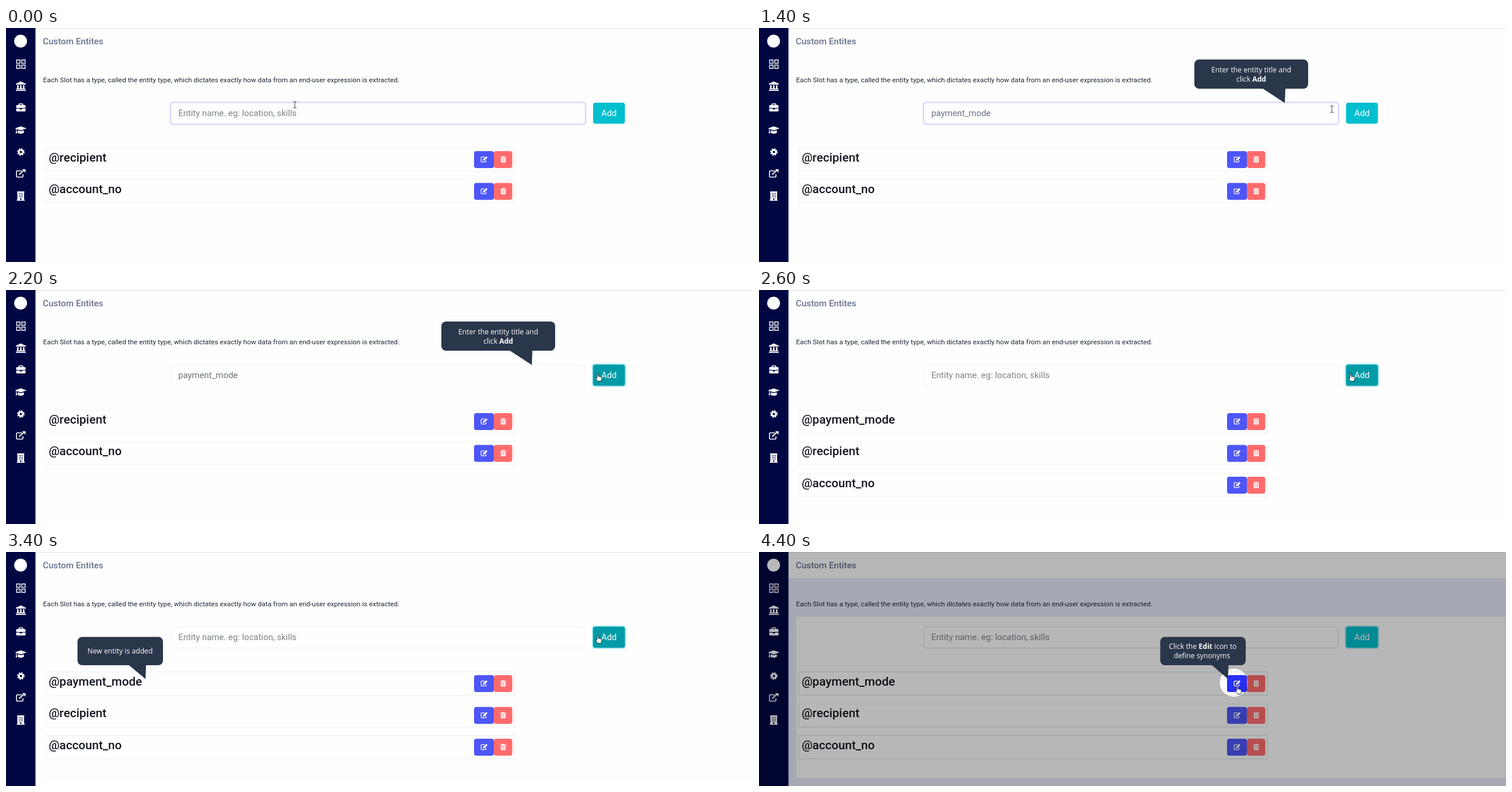
Recreate the animation shown at these times as an HTML page. Size 1280x401 px, loop 5.2 s.

```html
<!DOCTYPE html>
<html lang="en">
<head>
<meta charset="utf-8">
<title>Custom entities</title>
<style>
html, body { margin: 0; width: 100%; height: 100%; overflow: hidden; background: #fefefe; }
svg { display: block; width: 1280px; height: 401px; }
text { font-family: Roboto, sans-serif; white-space: pre; }
.title { font-size: 15.2px; font-weight: 500; fill: #68728f; }
.intro { font-size: 11.8px; fill: #1d2638; }
.field { font-size: 14.9px; fill: #687080; }
.hint { fill: #7d838c; }
.add text { font-size: 14.9px; fill: #fff; }
.name { font-size: 20.6px; font-weight: 500; fill: #141822; }
.tip { fill: #2a364a; }
.tip text { font: 12.2px "Open Sans", "Noto Sans", sans-serif; fill: #fff; text-anchor: middle; }
.tip tspan { font-weight: 700; }
.btns { color: #4d56f6; }
.line { fill: none; stroke: #f0f0f2; }
.rule { stroke: #f7f7f9; }

/* every state change is a hard step on one shared clock */
.t { animation: 5.2s step-end infinite; }
.backdrop { fill: #fefefe; animation-name: backdrop; }
.line.t { animation-name: line; }
.box { animation-name: box; }
.hint { animation-name: hint; }
.one { animation-name: one; }
.two { animation-name: two; }
.full { animation-name: full; }
.caret { animation-name: caret; }
.focus { animation-name: focus; }
.face { fill: #00bfce; animation-name: face; }
.halo { animation-name: halo; }
.old { animation-name: old; }
.new { animation-name: late; }
.hot { animation-name: hot; }
.tip1 { animation-name: tip1; }
.tip2 { animation-name: tip2; }
.dim { animation-name: dim; }
.beam { animation-name: beam; }
.hand { animation-name: hand; }
.arrow { animation-name: arrow; }

@keyframes backdrop { 0% { fill: #fefefe; } 73.076%, 100% { fill: #e7ebf8; } }
@keyframes line { 0% { stroke: #f0f0f2; } 73.076%, 100% { stroke: #d9dbe0; } }
@keyframes box { 0% { stroke: #f7f7fa; } 73.076%, 100% { stroke: #dfe1e7; } }
@keyframes hint { 0% { visibility: visible; } 3.846% { visibility: hidden; } 50%, 100% { visibility: visible; } }
@keyframes one { 0% { visibility: hidden; } 3.846% { visibility: visible; } 7.692%, 100% { visibility: hidden; } }
@keyframes two { 0% { visibility: hidden; } 7.692% { visibility: visible; } 11.538%, 100% { visibility: hidden; } }
@keyframes full { 0% { visibility: hidden; } 11.538% { visibility: visible; } 50%, 100% { visibility: hidden; } }
@keyframes caret {
  0% { visibility: hidden; transform: translateX(0); }
  3.846% { visibility: visible; transform: translateX(305px); }
  7.692% { visibility: visible; transform: translateX(314px); }
  11.538% { visibility: visible; transform: translateX(398px); }
  19.23%, 100% { visibility: hidden; transform: translateX(398px); }
}
@keyframes focus { 0% { visibility: visible; } 38.461%, 100% { visibility: hidden; } }
@keyframes face { 0% { fill: #00bfce; } 30.769% { fill: #009ba7; } 76.923%, 100% { fill: #00bfce; } }
@keyframes halo { 0% { visibility: hidden; } 38.461%, 100% { visibility: visible; } }
@keyframes old { 0% { transform: translateY(0); } 50%, 100% { transform: translateY(54.5px); } }
@keyframes late { 0% { visibility: hidden; } 50%, 100% { visibility: visible; } }
@keyframes hot { 0% { color: #4d56f6; } 80.769%, 100% { color: #2730f4; } }
@keyframes tip1 { 0% { visibility: hidden; } 7.692% { visibility: visible; } 50%, 100% { visibility: hidden; } }
@keyframes tip2 { 0% { visibility: hidden; } 61.538% { visibility: visible; } 76.923%, 100% { visibility: hidden; } }
@keyframes dim { 0% { visibility: hidden; } 73.076%, 100% { visibility: visible; } }
@keyframes beam {
  0% { visibility: visible; transform: translate(495px, 131.5px); }
  11.538% { visibility: visible; transform: translate(619px, 135.5px); }
  15.384% { visibility: visible; transform: translate(924px, 135.5px); }
  19.23% { visibility: visible; transform: translate(976.5px, 137px); }
  26.923% { visibility: visible; transform: translate(981.5px, 139px); }
  30.769%, 100% { visibility: hidden; transform: translate(981.5px, 139px); }
}
@keyframes hand {
  0% { visibility: hidden; transform: translate(1009.5px, 142px); }
  30.769% { visibility: visible; transform: translate(1009.5px, 142px); }
  73.076% { visibility: hidden; transform: translate(815.5px, 229px); }
  80.769%, 100% { visibility: visible; transform: translate(815.5px, 229px); }
}
@keyframes arrow {
  0% { visibility: hidden; transform: translate(978.5px, 181px); }
  73.076% { visibility: visible; transform: translate(978.5px, 181px); }
  76.923% { visibility: visible; transform: translate(928px, 221px); }
  80.769%, 100% { visibility: hidden; transform: translate(928px, 221px); }
}
</style>
</head>
<body>
<svg viewBox="0 0 1280 401" xmlns="http://www.w3.org/2000/svg">
  <defs>
    <g id="btns">
      <rect x="802" y="211" width="34" height="29" rx="4" fill="currentColor"/>
      <rect x="836" y="211" width="31.5" height="29" rx="4" fill="#ff6b6c"/>
      <g transform="translate(813 219)">
        <path d="M7 2.2H2.3Q1.2 2.2 1.2 3.3V9.5Q1.2 10.6 2.3 10.6H8.4Q9.5 10.6 9.5 9.5V7.4" fill="none" stroke="#fff" stroke-width="1.3"/>
        <path d="M4.4 6.2L9.9 .7 12.1 2.9 6.6 8.3 4.2 8.6Z" fill="#fff"/>
      </g>
      <g transform="translate(847 219.5)">
        <path d="M0 1.2H3L3.6 .2H6.4L7 1.2H10V2.5H0ZM.8 3.2H9.2V10Q9.2 11 8.2 11H1.8Q.8 11 .8 10Z" fill="#fff"/>
        <path d="M3.2 4.6V9.4M5 4.6V9.4M6.8 4.6V9.4" stroke="#ff6b6c" stroke-width=".7"/>
      </g>
    </g>
  </defs>

  <!-- page -->
  <rect class="t backdrop" width="1280" height="401"/>
  <rect x="50" width="1230" height="44" fill="#fefefe"/>
  <path class="line rule" d="M50 44.5H1280"/>
  <path d="M50 .5H1280" stroke="#e3e6e9"/>
  <g class="t old">
    <path class="line rule" d="M64 331.5H1279"/>
  </g>
  <g class="t dim">
    <rect x="64" y="111" width="1215" height="275" fill="#fefefe"/>
  </g>
  <text class="title" x="63" y="27.6">Custom Entites</text>
  <text class="intro" x="63.6" y="92.8">Each Slot has a type, called the entity type, which dictates exactly how data from an end-user expression is extracted.</text>

  <!-- sidebar -->
  <rect width="50.5" height="401" fill="#000743"/>
  <circle cx="25" cy="22.5" r="11" fill="#fff"/>
  <g fill="none" stroke="#fff" stroke-width="1.4">
    <path d="M18.2 54.7h5.8v5.8h-5.8zM27 54.7h5.8v5.8h-5.8zM18.2 63.5h5.8v5.8h-5.8zM27 63.5h5.8v5.8h-5.8z"/>
    <path d="M27 244.7H19.2Q18 244.7 18 245.9V254.3Q18 255.5 19.2 255.5H27.8Q29 255.5 29 254.3V250.5" stroke-width="1.6"/>
    <path d="M22.5 251.2L31 243.5" stroke-width="2"/>
  </g>
  <g fill="#fff">
    <path d="M25.3 91.5L34 95.5V97H17V95.5ZM19 98h2.6v5.5h2.4V98h2.6v5.5H29V98h2.6v5.5H33v1.5H18v-1.5h1zM17 105.8H34V107.8H17Z"/>
    <path d="M21.5 132V130.8Q21.5 129.3 23 129.3H28Q29.500 129.300 29.500 130.800V132H32Q33.500 132 33.500 133.500V137H17.500V133.500Q17.500 132 19 132ZM23 132H28V130.800H23ZM17.500 138H23.500V139.500H27.500V138H33.500V141.500Q33.500 143 32 143H19Q17.500 143 17.500 141.500Z" fill-rule="evenodd"/>
    <path d="M25.300 168.500L35.300 172 25.300 175.500 18.400 173.100V176L19.200 180.500H16.600L17.300 176V172.700L15.300 172ZM20.300 175.200L25.300 177 30.300 175.200 30.800 179.500Q25.300 182.800 19.900 179.500Z"/>
    <path d="M27.500 242H33.500V248Z"/>
    <path d="M19 280H31.500V281.500H31V294.300H32V296H18.500V294.300H19.500V281.500H19Z"/>
  </g>
  <g fill="none" stroke="#fff" transform="translate(25.500 212.500)">
    <circle r="3.600" stroke-width="3"/>
    <circle r="5.500" stroke-width="2" stroke-dasharray="2.160"/>
  </g>
  <path d="M22 283.500H29M22 286.500H29M22 289.500H29" stroke="#000743" stroke-width="1.500" stroke-dasharray="1.500 1.200"/>
  <path d="M24 292h2.500v2.500H24z" fill="#000743"/>

  <!-- entry field -->
  <rect class="line t box" x="282.500" y="128" width="710" height="36.500" rx="4"/>
  <g class="t focus" fill="none">
    <rect x="282" y="127.500" width="711" height="37.500" rx="4.500" stroke="#e5e4fd" stroke-width="3.500"/>
    <rect x="282.500" y="128" width="710" height="36.500" rx="4" fill="#fefefe" stroke="#cbc9f8"/>
  </g>
  <text class="t field hint" x="295.200" y="151.400">Entity name. eg: location, skills</text>
  <text class="t field one" x="295.200" y="151.400">p</text>
  <text class="t field two" x="295.200" y="151.400">pa</text>
  <text class="t field full" x="295.200" y="151.400">payment_mode</text>
  <path class="t caret" d="M0 138V155" stroke="#4b5260"/>
  <g class="add">
    <rect class="t halo" x="1004" y="126" width="58.500" height="40" rx="5.500" fill="#9ee6ec"/>
    <rect class="t face" x="1006" y="128" width="54.500" height="36" rx="4"/>
    <text x="1020" y="151.400">Add</text>
  </g>

  <!-- entities -->
  <g class="t new">
    <rect class="line t" x="68.500" y="205.500" width="803" height="40"/>
    <text class="name" x="73.200" y="228.800">@payment_mode</text>
    <use class="btns t hot" href="#btns"/>
  </g>
  <g class="t old">
    <rect class="line t" x="68.500" y="205.500" width="803" height="40"/>
    <text class="name" x="73.200" y="228.800">@recipient</text>
    <use class="btns" href="#btns"/>
    <g transform="translate(0 54.500)">
      <rect class="line t" x="68.500" y="205.500" width="803" height="40"/>
      <text class="name" x="73.200" y="228.800">@account_no</text>
      <use class="btns" href="#btns"/>
    </g>
  </g>

  <!-- callouts -->
  <g class="tip t tip1">
    <rect x="746" y="54" width="195" height="50" rx="8"/>
    <path d="M862 103H902L901 128.500Z"/>
    <text x="843.500" y="75.500">Enter the entity title and</text>
    <text x="843.500" y="91.500">click <tspan>Add</tspan></text>
  </g>
  <g class="tip t tip2">
    <rect x="122.500" y="145.500" width="146.500" height="48.500" rx="8"/>
    <path d="M209.500 193H240L239 217.500Z"/>
    <text x="195.500" y="174.300">New entity is added</text>
  </g>

  <!-- pointers -->
  <path class="t beam" d="M-2.800 -5.500H-1Q0 -5.500 0 -4.500Q0 -5.500 1 -5.500H2.800M0 -4.500V4.500M-2.800 5.500H-1Q0 5.500 0 4.500Q0 5.500 1 5.500H2.800" fill="none" stroke="#3d3f45"/>
  <path class="t arrow" d="M0 0V11.500L2.700 9 4.500 13 6.200 12.300 4.400 8.300H8Z" fill="#fff" stroke="#222" stroke-width=".9"/>
  <path class="t hand" d="M3 2Q3 .6 4.100 .6Q5.200 .6 5.200 2V6Q6.400 5.200 7.200 6.300Q8.500 5.600 9.200 6.800Q10.900 6.400 11.100 8V10.500Q11.100 12.500 10 14.500H4.600Q3.500 12.500 .7 9.800Q.4 8.300 1.900 8.300L3 9.400Z" fill="#fff" stroke="#111" stroke-width=".9"/>

  <!-- spotlight -->
  <g class="t dim">
    <path d="M0 0H1280V401H0ZM789.500 224a24.250 24 0 1 0 48.500 0a24.250 24 0 1 0 -48.500 0Z" fill-rule="evenodd" fill-opacity=".28"/>
    <g class="tip">
      <rect x="687.500" y="145.500" width="146.500" height="48.500" rx="8"/>
      <path d="M775 193H804.500L803.500 217.500Z"/>
      <text x="760.500" y="166.300">Click the <tspan>Edit</tspan> icon to</text>
      <text x="759" y="182.300">define synonyms</text>
    </g>
  </g>
</svg>
</body>
</html>
```
